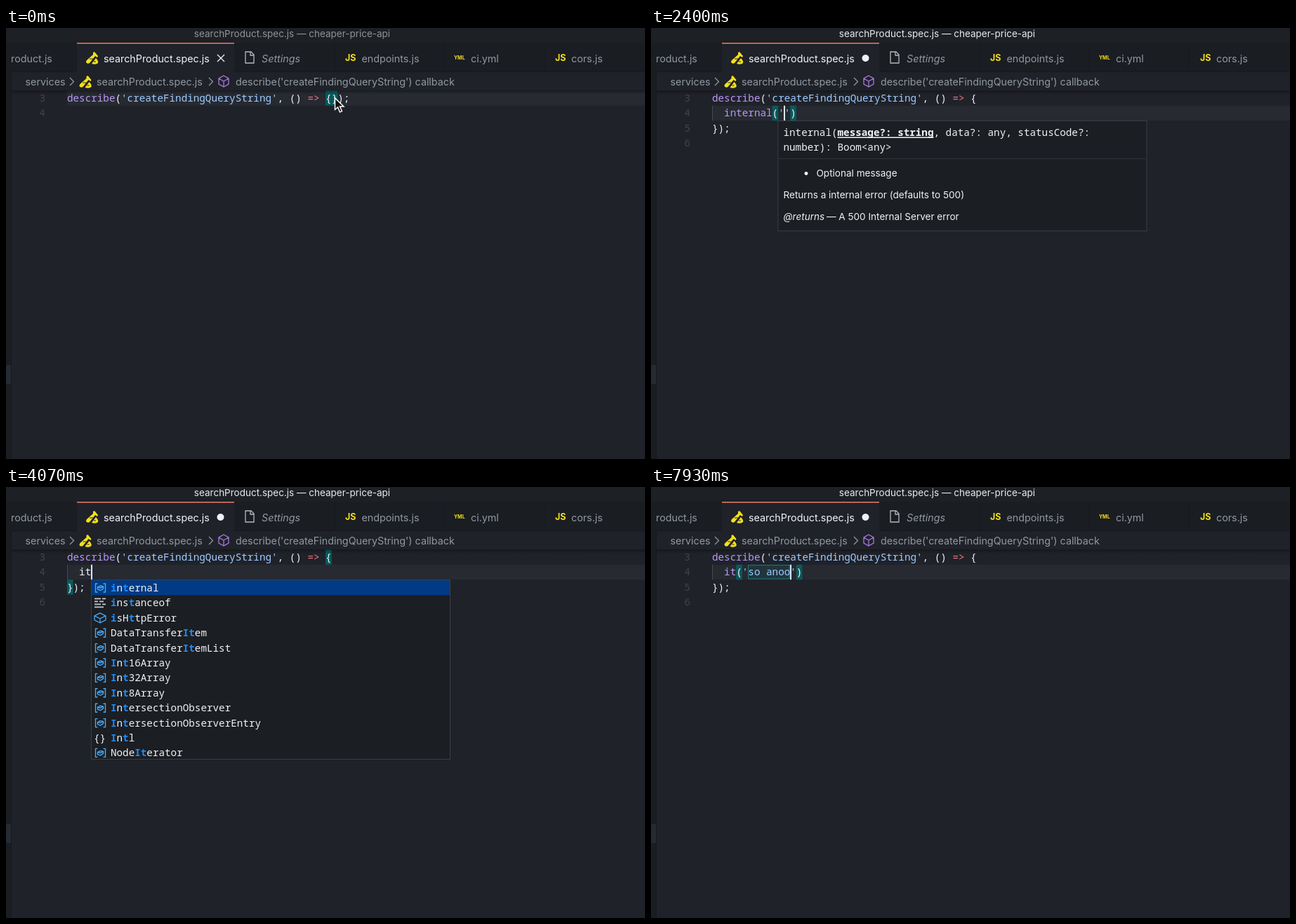
Animation, 910 px wide and 615 px high, one loop 8 s. Source, as an HTML page with a canvas:

```html
<!DOCTYPE html>
<html lang="en">
<head>
<meta charset="utf-8">
<title>Editor autocomplete</title>
<style>
  html, body { margin: 0; width: 100%; height: 100%; overflow: hidden; background: #1f2229; }
  canvas { display: block; }
</style>
</head>
<body>
<canvas id="stage" width="910" height="615"></canvas>
<script>
const ctx = document.getElementById('stage').getContext('2d');
const LOOP = 8000, CHAR = 8.56, ROW = 21.4, LEFT = 87, TOP = 89.4;
const C = {
  editor: '#1f2229', dark: '#1a1d22', line: '#272a31', border: '#3a3e44', text: '#f0f3f6',
  dim: '#9298a0', number: '#3f444c', purple: '#b998f5', string: '#9ecbff', red: '#f97583',
  yellow: '#f5e01c', teal: '#0a5a5d', popup: '#1b1e22', blue: '#013a85', match: '#1b8cff', icon: '#4aa8f5'
};
const mono = '14.27px "Noto Sans Mono", monospace';
const ui = (size = 14.3, style = '') => `${style} ${size}px Inter, sans-serif`;

// Contents of the edited line; "|" is the caret.
const typing = [
  [1630, '|'], [1900, 'i|'], [1950, 'it|'], [2270, 'internal|'], [2330, 'internal(|)'],
  [2400, "internal('|')"], [2700, 'internal(|)'], [2770, 'internal|'], [3200, 'interna|'],
  [3280, 'intern|'], [3400, 'inter|'], [3500, 'inte|'], [3600, 'in|'], [3670, 'i|'], [3740, '|'],
  [3830, 'i|'], [4000, 'it|'], [4600, 'it |'], [4830, 'it|'], [5130, 'it(|)'], [5400, "it('|')"],
  [5900, "it('s|')"], [6870, "it('so|')"], [7000, "it('so |')"], [7200, "it('so a|')"],
  [7300, "it('so an|')"], [7530, "it('so ano|')"], [7730, "it('so anoo|')"]
];
const suggestions = ['internal', 'instanceof', 'isHttpError', 'DataTransferItem', 'DataTransferItemList',
  'Int16Array', 'Int32Array', 'Int8Array', 'IntersectionObserver', 'IntersectionObserverEntry', 'Intl', 'NodeIterator'];

const between = (t, a, b) => t >= a && t < b;
const ramp = (t, a, b) => Math.max(0, Math.min(1, (t - a) / (b - a)));
const colX = col => LEFT + col * CHAR;
const rowY = row => TOP + row * ROW;

function box(x, y, w, h, fill) {
  ctx.fillStyle = fill;
  ctx.fillRect(x, y, w, h);
}
function text(str, x, y, color, font = ui(), align = 'left') {
  ctx.font = font;
  ctx.textAlign = align;
  ctx.fillStyle = color;
  ctx.fillText(str, x, y);
}
function code(parts, x, y) {
  for (const [str, color, weight = ''] of parts) {
    text(str, x, y, color, `${weight} ${mono}`);
    x += str.length * CHAR;
  }
}
function path(d, x, y, { stroke, fill, width = 1.3 }) {
  const shape = new Path2D(d);
  ctx.save();
  ctx.translate(x, y);
  if (fill) { ctx.fillStyle = fill; ctx.fill(shape); }
  if (stroke) { ctx.strokeStyle = stroke; ctx.lineWidth = width; ctx.stroke(shape); }
  ctx.restore();
}
function panel(x, y, w, h, fill) {
  box(x, y, w, h, C.border);
  box(x + 1, y + 1, w - 2, h - 2, fill);
}

const cube = 'M8 0L15 4V12L8 16L1 12V4ZM1 4L8 8L15 4M8 8V16';
function testIcon(x, y) {
  path('M10 1L12 0L17 6L16 8L13 6L5 16Q2 18 0 15Q0 13 1 12L10 4Z', x, y, { fill: C.yellow });
  path('M14 9Q18 13 17 16Q14 19 8 17Z', x, y, { fill: C.yellow });
  path('M5 10L10 10M11 14L14 14', x, y, { stroke: C.editor, width: 1.2 });
}

function drawChrome(t) {
  box(0, 0, 910, 615, C.editor);
  box(0, 0, 910, 21, '#1d2025');
  box(0, 21, 910, 42, C.dark);
  box(0, 62, 910, 1, '#17191d');
  box(0, 21, 7, 594, C.dark);
  box(7, 63, 1, 552, '#17191d');
  box(0, 481, 7, 27, '#262a32');
  for (const x of [468, 623, 766]) box(x, 22, 1, 40, '#17191d');
  box(101, 21, 224, 42, C.editor);
  box(101, 21, 224, 1.5, '#f07a68');

  const shade = Math.round(145 + 88 * ramp(t, 20, 130));
  text('searchProduct.spec.js — cheaper-price-api', 407.5, 13, `rgb(${shade},${shade + 2},${shade + 5})`, ui(13.5), 'center');

  text('roduct.js', 7, 48.5, C.dim);
  testIcon(114, 34);
  text('searchProduct.spec.js', 139, 48.5, C.text);
  if (t < 1630) {
    path('M0 0L10 10M10 0L0 10', 301, 38, { stroke: C.text });
  } else {
    path('M5 0A5 5 0 1 1 4.99 0Z', 300.5, 38, { fill: C.text });
  }
  path('M1 1H9L13 5V17H1ZM8 1V6H13', 340, 33, { stroke: '#b4b9bf' });
  text('Settings', 364, 48.5, C.dim, ui(14.3, 'italic'));
  text('JS', 483, 47, C.yellow, ui(12.5, 'bold'));
  text('endpoints.js', 506.5, 48.5, C.dim);
  text('YML', 638, 45, C.yellow, ui(7, 'bold'));
  text('ci.yml', 662, 48.5, C.dim);
  text('JS', 782, 47, C.yellow, ui(12.5, 'bold'));
  text('cors.js', 805, 48.5, C.dim);

  text('services', 27.5, 82, C.dim);
  testIcon(104.5, 68);
  text('searchProduct.spec.js', 129, 82, C.dim);
  path(cube, 302, 68, { stroke: '#a878dc' });
  text("describe('createFindingQueryString') callback", 327, 82, C.dim);
  for (const x of [91, 289]) path('M0 0L5.5 5.5L0 11', x, 71, { stroke: C.dim });
}

// Shadow below the breadcrumb bar, over the scrolled code.
function drawScrollShadow() {
  const fade = ctx.createLinearGradient(0, 89, 0, 95);
  fade.addColorStop(0, 'rgba(0,0,0,.3)');
  fade.addColorStop(1, 'rgba(0,0,0,0)');
  box(8, 89, 902, 6, fade);
}

const bracket = (col, row) => box(colX(col), rowY(row), CHAR, ROW, C.teal);
const caretAt = (col, row) => box(Math.floor(colX(col)), rowY(row), 2, ROW, '#d6e8ff');

function drawCode(t, before, after) {
  const open = t >= 1630, line = before + after;
  box(LEFT, rowY(open ? 1 : 0), 823, ROW, C.line);
  for (let n = 0; n < (open ? 4 : 2); n++) text(n + 3, 56, rowY(n) + 15.4, C.number, mono, 'right');

  const paren = line.indexOf('(');
  if (paren >= 0) {
    bracket(2 + paren, 1);
    bracket(1 + line.length, 1);
  } else {
    bracket(43, 0);
    open ? bracket(0, 2) : bracket(44, 0);
  }
  code([['describe', C.purple], ['(', C.text], ["'createFindingQueryString'", C.string],
    [', () ', C.text], ['=>', C.red], [open ? ' {' : ' {});', C.text]], LEFT, rowY(0) + 15.4);
  if (!open) {
    if (between(t, 100, 630) || t >= 1100) caretAt(44, 0);
    return;
  }
  code([['});', C.text]], LEFT, rowY(2) + 15.4);
  box(LEFT, rowY(1), 1, ROW, '#454a52');
  if (t >= 7930) {
    box(138, 111, 59, 20.5, '#20353d');
    ctx.strokeStyle = '#23777c';
    ctx.lineWidth = 1;
    ctx.strokeRect(138.5, 111.5, 58.5, 19.5);
  }
  const called = paren >= 0 || line === 'internal';
  const parts = (line.match(/'[^']*'|[()]|[^'()]+/g) || []).map(s =>
    [s, s[0] === "'" ? C.string : called && /\w/.test(s) ? C.purple : C.text]);
  code(parts, colX(2), rowY(1) + 15.4);
  if (!between(t, 6400, 6870)) caretAt(2 + before.length, 1);
}

function suggestion(label, x, y) {
  const pair = label.indexOf('It');
  const hits = pair >= 0 ? [pair, pair + 1] : [0, label.indexOf('t')];
  code([...label].map((ch, i) => hits.includes(i) ? [ch, C.match, 'bold'] : [ch, C.text]), x, y);
}

function kindIcon(label, x, y) {
  if (label === 'Intl') {
    text('{}', x - 1, y + 12, C.text, mono);
  } else if (label === 'instanceof') {
    path('M0 2H9M11 2H16M0 6H5M7 6H13M0 10H9M11 10H16M0 14H13', x, y - 1, { stroke: '#c5c9ce', width: 1.6 });
  } else if (label === 'isHttpError') {
    path('M8 0L16 4V10L8 14L0 10V4ZM0 4L8 8L16 4M8 8V14', x, y, { stroke: C.icon });
  } else {
    path('M4 1H1V13H4M12 1H15V13H12M8 4L12 5V8L8 10.5L4 9V6ZM4 6L8 7L12 5', x + 0.5, y, { stroke: C.icon, width: 1.4 });
  }
}

function drawList(detail, scrollbar) {
  panel(121, 132, 512, 257, C.popup);
  box(122, 133, 510, ROW, C.blue);
  suggestions.forEach((label, i) => {
    const y = 149 + i * ROW;
    kindIcon(label, 126, y - 12);
    suggestion(label, 149, y);
  });
  ctx.globalAlpha = detail;
  text('const internal: <Data>(…', 408.5, 149, '#a5b6d0', mono);
  ctx.globalAlpha = scrollbar;
  box(620, 133, 12, 56, 'rgba(70,78,88,.45)');
  ctx.globalAlpha = 1;
}

function drawImport() {
  panel(129.5, 132, 511.5, 22, C.blue);
  ctx.setLineDash([1.5, 1.5]);
  path('M0 0H15V15H0Z', 135.5, 136.5, { stroke: C.text, width: 1.2 });
  ctx.setLineDash([]);
  suggestion('import statement', 157, 149);
  text('Import external module.…', 417, 149, '#a5b6d0', mono);
}

function drawSignature(x) {
  panel(x, 132, 526, 158, C.popup);
  box(x + 1, 186, 524, 1, '#30343a');
  const left = x + 8, doc = ui(13.55);
  code([['internal(', C.text], ['message?: string', C.text, 'bold'], [', data?: any, statusCode?:', C.text]], left, 154);
  box(left + 9 * CHAR, 155.5, 16 * CHAR, 1.5, C.text);
  code([['number): Boom<any>', C.text]], left, 175.4);
  path('M2.5 0A2.5 2.5 0 1 1 2.49 0Z', x + 38, 205, { fill: C.text });
  text('Optional message', x + 55, 212, C.text, doc);
  text('Returns a internal error (defaults to 500)', left, 243, C.text, doc);
  text('@returns', left, 274, C.text, ui(13.55, 'italic'));
  text('— A 500 Internal Server error', x + 69.5, 274, C.text, doc);
}

function draw() {
  const t = performance.now() % LOOP;
  const [, line] = typing.findLast(([start]) => t >= start) || [0, '|'];
  const [before, after] = line.split('|');
  drawChrome(t);
  drawCode(t, before, after);
  drawScrollShadow();
  if (between(t, 2000, 2270)) drawList(1, 1);
  if (between(t, 4030, 4600)) drawList(t >= 4130 ? 1 : 0, ramp(t, 4100, 4200));
  if (between(t, 4670, 4830)) drawImport();
  if (between(t, 2370, 2900)) drawSignature(t < 2770 ? 180.5 : 172);
  if (t < 60) {
    path('M0 0V16.5L4 13L7 20L10 18.7L7 12H12.5Z', 468.5, 100, { fill: '#111', stroke: '#fff', width: 1.4 });
  }
  requestAnimationFrame(draw);
}
draw();
</script>
</body>
</html>
```
